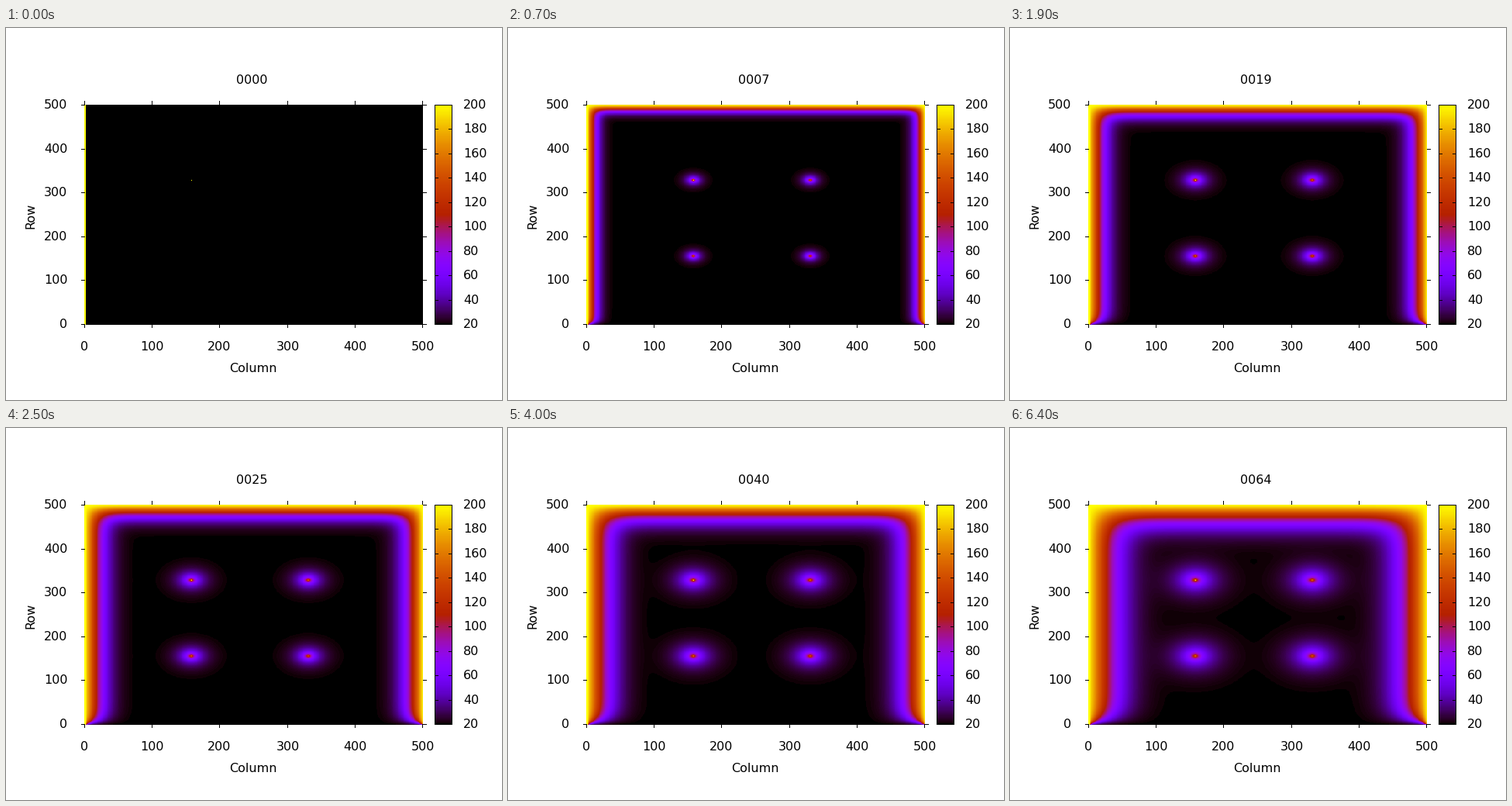
Recreate the animation shown at these times as a matplotlib script. Size 640 by 480 pixels, loop 6.5 s.

```python
import numpy as np
import matplotlib.pyplot as plt
from matplotlib.animation import FuncAnimation
from matplotlib.patches import Rectangle

W, H, DPI = 640, 480, 100
FRAMES, INTERVAL = 65, 100
LEFT, RIGHT, TOP, BOTTOM = 101, 537, 99, 382
BAR_L, BAR_R = 553, 575
COLD, HOT = 20, 200
N = 501
SOURCES = np.ix_([157, 330], [157, 330])
STEPS, RATE = 50, 0.235
FONT = 16 * 72 / DPI

plt.rcParams["font.family"] = "DejaVu Sans"


def palette(level):
    """Black, violet, red, yellow ramp in 256 steps."""
    g = np.clip(np.floor(np.clip(level, 0, 1) * 256), 0, 255) / 255
    rgb = np.stack([np.sqrt(g), g ** 3, np.clip(np.sin(2 * np.pi * g), 0, 1)], -1)
    return np.round(rgb * 255).astype(np.uint8)


# Grid cell shown by each screen pixel
px = np.arange(LEFT, RIGHT + 1)
py = np.arange(TOP, BOTTOM + 1)
cols = np.clip(np.floor(1.9 + (px - 103) * 500 / 436), 0, N - 2).astype(int)
rows = np.clip(np.floor(1.4 + (BOTTOM - py) * 500 / 283), 0, N - 2).astype(int)
VIEW = np.ix_(rows, cols)


def simulate():
    """Heat spreading from three walls and four fixed hot points."""
    t = np.full((N, N), COLD, np.float32)
    t[:, 0] = t[:, -1] = t[-1] = HOT
    t[SOURCES] = HOT
    inner = t[1:-1, 1:-1]
    s = np.empty_like(inner)
    shots = [t[VIEW]]
    for _ in range(FRAMES - 1):
        for _ in range(STEPS):
            np.add(t[:-2, 1:-1], t[2:, 1:-1], out=s)
            s += t[1:-1, :-2]
            s += t[1:-1, 2:]
            s *= np.float32(RATE)
            inner *= np.float32(1 - 4 * RATE)
            inner += s
            t[SOURCES] = HOT
        shots.append(t[VIEW])
    return shots


fields = simulate()

fig = plt.figure(figsize=(W / DPI, H / DPI), dpi=DPI, facecolor="white")
ax = fig.add_axes([0, 0, 1, 1])


def box(x, y, w, h):
    ax.add_patch(Rectangle((x, y), w, h, fc="black", ec="none", lw=0,
                           antialiased=False, zorder=3))


def label(x, base, text, ha="center"):
    return ax.text(x, base, text, ha=ha, va="baseline", fontsize=FONT, color="black")


def heat_image(rgb, x, y):
    h, w = rgb.shape[:2]
    return ax.imshow(rgb, extent=(x, x + w, y + h, y),
                     interpolation="nearest", aspect="auto", zorder=2)


def shade(n):
    return palette((fields[n] - COLD) / (HOT - COLD))


heat = heat_image(shade(0), LEFT, TOP)

ramp = palette(np.linspace(1, 0, BOTTOM - TOP + 1))
heat_image(np.repeat(ramp[:, None], BAR_R - BAR_L + 1, axis=1), BAR_L, TOP)
for y in (TOP, BOTTOM):
    box(BAR_L, y, BAR_R - BAR_L + 1, 1)
for x in (BAR_L, BAR_R):
    box(x, TOP, 1, BOTTOM - TOP + 1)

for i in range(6):
    x = round(LEFT + (RIGHT - LEFT) * i / 5)
    y = round(BOTTOM - (BOTTOM - TOP) * i / 5)
    box(x, TOP - 5, 1, 5)
    box(x, BOTTOM, 1, 5)
    box(LEFT - 4, y, 5, 1)
    box(RIGHT + 1, y, 5, 1)
    label(x + 0.5, 416, str(100 * i))
    label(79.5, y + 5, str(100 * i), "right")

for i in range(10):
    y = round(BOTTOM - (BOTTOM - TOP) * i / 9)
    box(BAR_L, y, 5, 1)
    box(BAR_R - 4, y, 5, 1)
    label(590, y + 5, str(COLD + 20 * i), "left")

label(318.5, 444, "Column")
ax.text(39, 242, "Row", rotation=90, ha="right", va="center", fontsize=FONT)
title = label(317, 72, "0000")

ax.set_xlim(0, W)
ax.set_ylim(H, 0)
ax.axis("off")


def update(n):
    heat.set_data(shade(n))
    title.set_text(f"{n:04d}")
    return heat, title


anim = FuncAnimation(fig, update, frames=FRAMES, interval=INTERVAL,
                     repeat=True, repeat_delay=0, blit=False)
plt.show()
```
